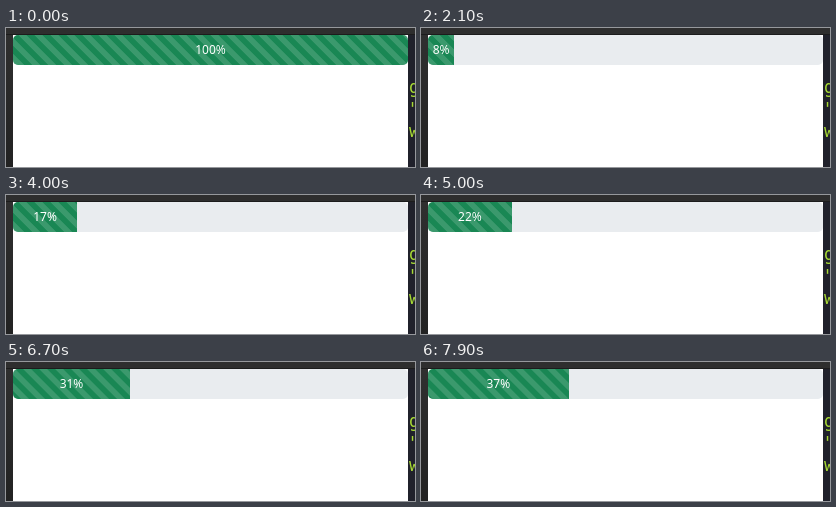
An HTML page for the animation above (8 s loop, 409 by 139 pixels).

```html
<!DOCTYPE html>
<html lang="en">
<head>
<meta charset="utf-8">
<title>Progress bar</title>
<style>
  html, body { margin: 0; width: 100%; height: 100%; overflow: hidden; }
  body { position: relative; background: linear-gradient(#303030, #222); }
  .top { position: absolute; inset: 0 0 auto; height: 6px; background: #2e2e2e; border-bottom: 1px solid #1c1c1c; }
  .page { position: absolute; left: 7px; top: 7px; width: 395px; height: 132px; background: #fff; }
  .editor {
    position: absolute; left: 402px; top: 7px; width: 7px; height: 132px; overflow: hidden;
    background: #20212b; color: #a6d834; white-space: pre;
    font: 17px/22px "DejaVu Sans Mono", monospace;
  }
  .editor div { margin: 41px 0 0 1px; }
  .progress { height: 30px; overflow: hidden; border-radius: 5px; background: #e9ecef; }
  .bar {
    height: 30px; overflow: hidden; white-space: nowrap; text-align: center; color: #fff;
    font: 12px/30px "Noto Sans", sans-serif;
    background: #198754 linear-gradient(45deg, #fff2 25%, #0000 25% 50%, #fff2 50% 75%, #0000 75%) 0 0 / 16px 16px;
    --light: rgba(255, 255, 255, .15);
    background-image: linear-gradient(45deg, var(--light) 25%, #0000 25% 50%, var(--light) 50% 75%, #0000 75%);
  }
</style>
</head>
<body>
<div class="top"></div>
<div class="page"><div class="progress"><div class="bar"></div></div></div>
<div class="editor"><div>g
"
w</div></div>
<script>
const LOOP = 8000, FRAME = 100, RESET = 300, START = 405, STEP = 200, TRANSITION = 600;
const bar = document.querySelector('.bar');

const bezier = (a, b, u) => 3 * a * u * (1 - u) ** 2 + 3 * b * u * u * (1 - u) + u ** 3;

// CSS "ease": cubic-bezier(.25, .1, .25, 1)
function ease(x) {
  let lo = 0, hi = 1;
  for (let i = 0; i < 24; i++) {
    const mid = (lo + hi) / 2;
    if (bezier(.25, .25, mid) < x) lo = mid; else hi = mid;
  }
  return bezier(.1, 1, lo);
}

// Share of the distance still open when the next step restarts the transition
const rest = 1 - ease(STEP / TRANSITION);

function progress(t) {
  if (t < RESET) return { value: 100, width: 100 };
  const value = Math.max(0, Math.floor((t - START) / STEP));
  const sinceStep = t - START - value * STEP;
  const lag = (1 - rest ** value) / (1 - rest);
  return { value, width: value && value - lag * (1 - ease(sinceStep / TRANSITION)) };
}

function draw(now) {
  const t = Math.floor(now % LOOP / FRAME) * FRAME;
  const { value, width } = progress(t);
  const phase = (t - RESET + 1000) % 1000 / 1000;
  bar.textContent = value + '%';
  bar.style.width = width + '%';
  bar.style.backgroundPositionX = 16 * (1 - phase) + 'px';
  requestAnimationFrame(draw);
}
draw(performance.now());
</script>
</body>
</html>
```
